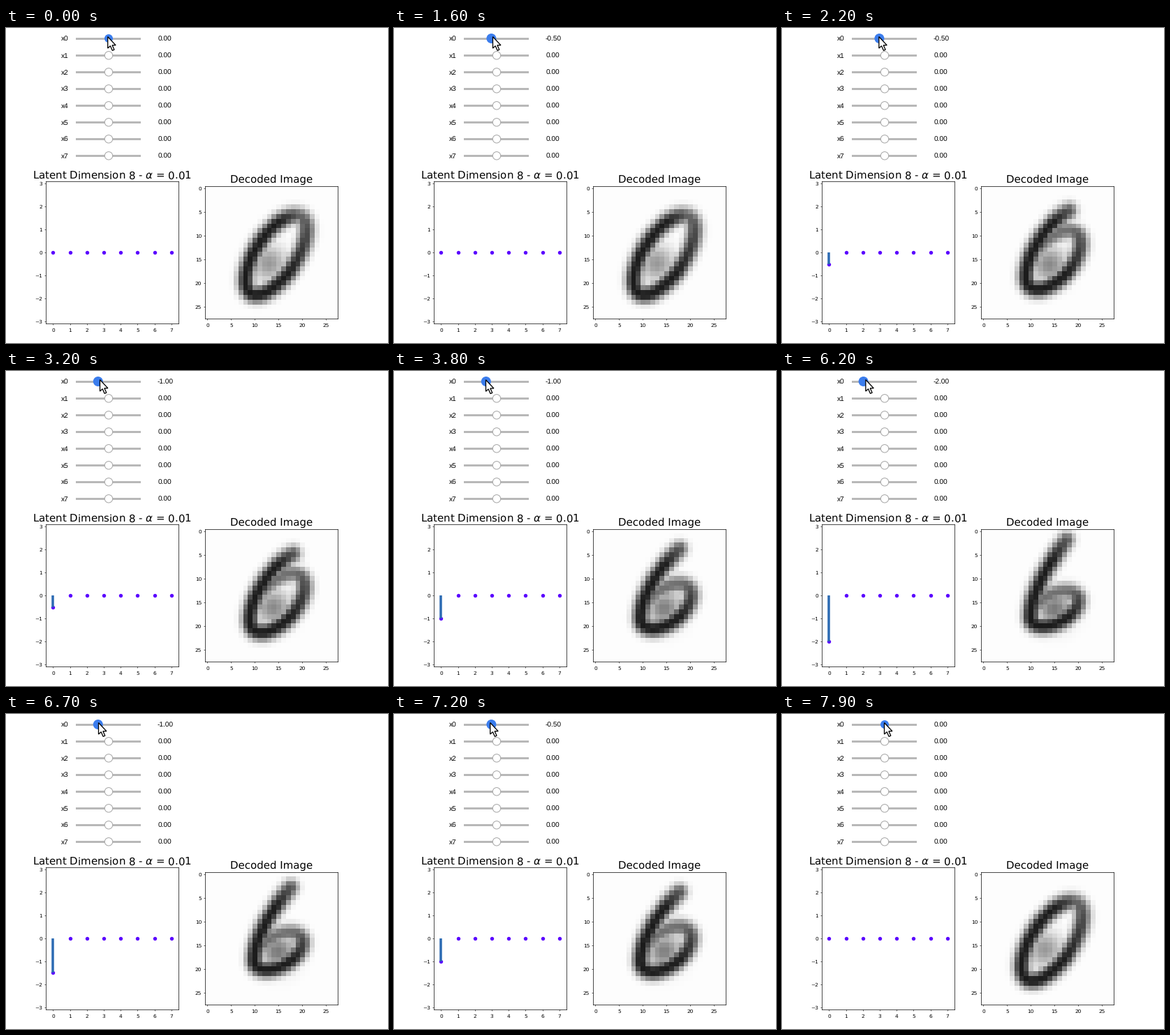
A matplotlib script for the animation above (8000 ms loop, 547 px wide and 452 px high).

```python
import matplotlib.pyplot as plt
import numpy as np
from matplotlib.animation import FuncAnimation
from matplotlib.patches import Circle, Polygon, Rectangle

W, H, DPI = 547, 452, 64
PX = 72 / DPI  # points per pixel
STEP = 100
FRAMES = 80
PRESS, RELEASE = 0.9, 7.9
LAG = 0.3  # seconds until the plots follow the slider

# Drags of the cursor: start, end (seconds), x reached
DRAGS = [(1.2, 1.6, 141), (2, 2.3, 137), (2.9, 3, 136.2), (3.1, 3.2, 134),
         (3.4, 3.8, 131), (4, 4.9, 116.8), (6.1, 6.7, 132), (6.7, 7, 135),
         (7.1, 7.5, 144), (7.7, 7.9, 146)]

plt.rcParams["text.hinting"] = "no_hinting"


def cursor_x(t):
    x = 145.2
    for start, end, goal in DRAGS:
        x += (goal - x) * np.clip((t - start) / (end - start), 0, 1)
    return x


def cursor_y(t):
    return 11.5 + 3 * np.exp(-((t - 4.6) / 0.5) ** 2)


def slider_value(t):
    """Slider value, in steps of one half."""
    return min(0, round((cursor_x(t) - 146.8) / 7.6) / 2)


def pen_stroke(value):
    """Curve of a slanted 0 that turns into a 6 as value goes from 0 to -2."""
    k = 1 + value / 2
    q = k ** 2.2
    cx, cy = 14.9 - .5 * q, 16.4 - 2.3 * q
    rx, ry = 5 + 1.4 * q, 3.7 + 4.7 * q
    slant = 1.08 - .2 * q

    turn = np.linspace(0, 2 * np.pi + 1.2, 120)
    x = cx + rx * np.cos(turn + slant)
    y = cy - ry * np.cos(turn)
    # Pull the start of the loop out into the stem
    pull = np.clip(1 - turn / 2.2, 0, 1) ** 1.3
    x, y = (x + (17.4 + 1.1 * q - x[0]) * pull,
            y + (1.9 + 3.9 * k - y[0]) * pull)
    ink = (.94 - .25 * np.clip(1 - turn / .6, 0, 1)
           - .35 * np.clip((turn - 4.2) / 2, 0, 1))
    haze = (cx - 1.5 * q, cy + 1.8 * q, .55 - .13 * q)
    return x, y, ink, haze


def decode(value):
    x, y, ink, (hx, hy, amount) = pen_stroke(value)
    rows, cols = np.mgrid[:28, :28]
    dist = np.hypot(cols[..., None] - x, rows[..., None] - y)
    line = (ink * np.exp(-(dist / 1.75) ** 2.4)).max(axis=-1)
    haze = amount * np.exp(-((cols - hx) ** 2 + (rows - hy) ** 2) / 13)
    return .008 + .94 * np.maximum(line, haze)


fig = plt.figure(figsize=(W / DPI, H / DPI), dpi=DPI, facecolor="white")


def box_axes(left, top, right, bottom):
    ax = fig.add_axes([left / W, 1 - bottom / H,
                       (right - left) / W, (bottom - top) / H])
    for spine in ax.spines.values():
        spine.set_linewidth(.7 * PX)
    ax.tick_params(length=2.2 * PX, width=.6 * PX, pad=2.8 * PX,
                   labelsize=7.4 * PX)
    ax.tick_params(axis="x", pad=4 * PX)
    return ax


latent = box_axes(57.1, 220.1, 247.1, 424.1)
latent.set(xlim=(-.43, 7.43), ylim=(-3.1, 3.1),
           xticks=range(8), yticks=range(-3, 4))
stem, = latent.plot([0, 0], [0, 0], color="#2c6bb3", lw=3.5 * PX, zorder=4,
                    solid_capstyle="butt")
dots, = latent.plot(range(8), [0] * 8, "o", color="#5a00ff",
                    ms=5.4 * PX, mew=0, zorder=3)

decoded = box_axes(285.1, 227.1, 475.1, 417.1)
picture = decoded.imshow(decode(0), cmap="gray_r", vmin=0, vmax=1,
                         interpolation="nearest", aspect="auto")
decoded.set(xticks=range(0, 28, 5), yticks=range(0, 28, 5))

# Pixel canvas for titles, sliders and cursor
ui = fig.add_axes([0, 0, 1, 1], facecolor="none")
ui.set(xlim=(0, W), ylim=(H, 0))
ui.axis("off")


def label(x, y, text, ha, size=10.1, font="Liberation Sans"):
    return ui.text(x, y, text, ha=ha, va="baseline", fontsize=size * PX,
                   fontfamily=font)


label(151.5, 216.5, r"Latent Dimension 8 - $\alpha$ = 0.01", "center",
      15, "DejaVu Sans")
label(380.3, 222, "Decoded Image", "center", 15, "DejaVu Sans")

handles, readouts = [], []
for i in range(8):
    y = 15.3 + 24 * i
    label(79, y + 3.7, f"x{i}", "left")
    ui.add_patch(Rectangle((100, y - 1.3), 93, 3, color="#b8b8b8", lw=0))
    handles.append(ui.add_patch(Circle((147, y), 5.7, fc="white",
                                       ec="#a6a6a6", lw=PX, zorder=2)))
    readouts.append(label(227.6, y + 3.7, "0.00", "center"))
handles[0].set(fc="#3b7ded", ec="#3b7ded", lw=0)

ARROW = np.array([(0, 0), (0, 16.5), (3.7, 13.2), (6.6, 19.8),
                  (9.3, 18.6), (6.4, 12.2), (11.4, 12.2)])
cursor = ui.add_patch(Polygon(ARROW, fc="white", ec="black",
                              lw=1.3 * PX, zorder=5))


def update(frame):
    t = frame * STEP / 1000
    cursor.set_xy(ARROW + [cursor_x(t) + .5, cursor_y(t) + 1])

    value = slider_value(t)
    handles[0].center = (147 + 15.2 * value, 15)
    handles[0].set_radius(7 if PRESS <= t < RELEASE else 6)
    readouts[0].set_text(f"{value:.2f}" if value else "0.00")

    shown = slider_value(t - LAG)
    stem.set_ydata([0, shown])
    dots.set_ydata([shown] + [0] * 7)
    picture.set_data(decode(shown))
    return cursor, handles[0], readouts[0], stem, dots, picture


anim = FuncAnimation(fig, update, frames=FRAMES, interval=STEP,
                     repeat=True, repeat_delay=0, blit=False)
plt.show()
```
